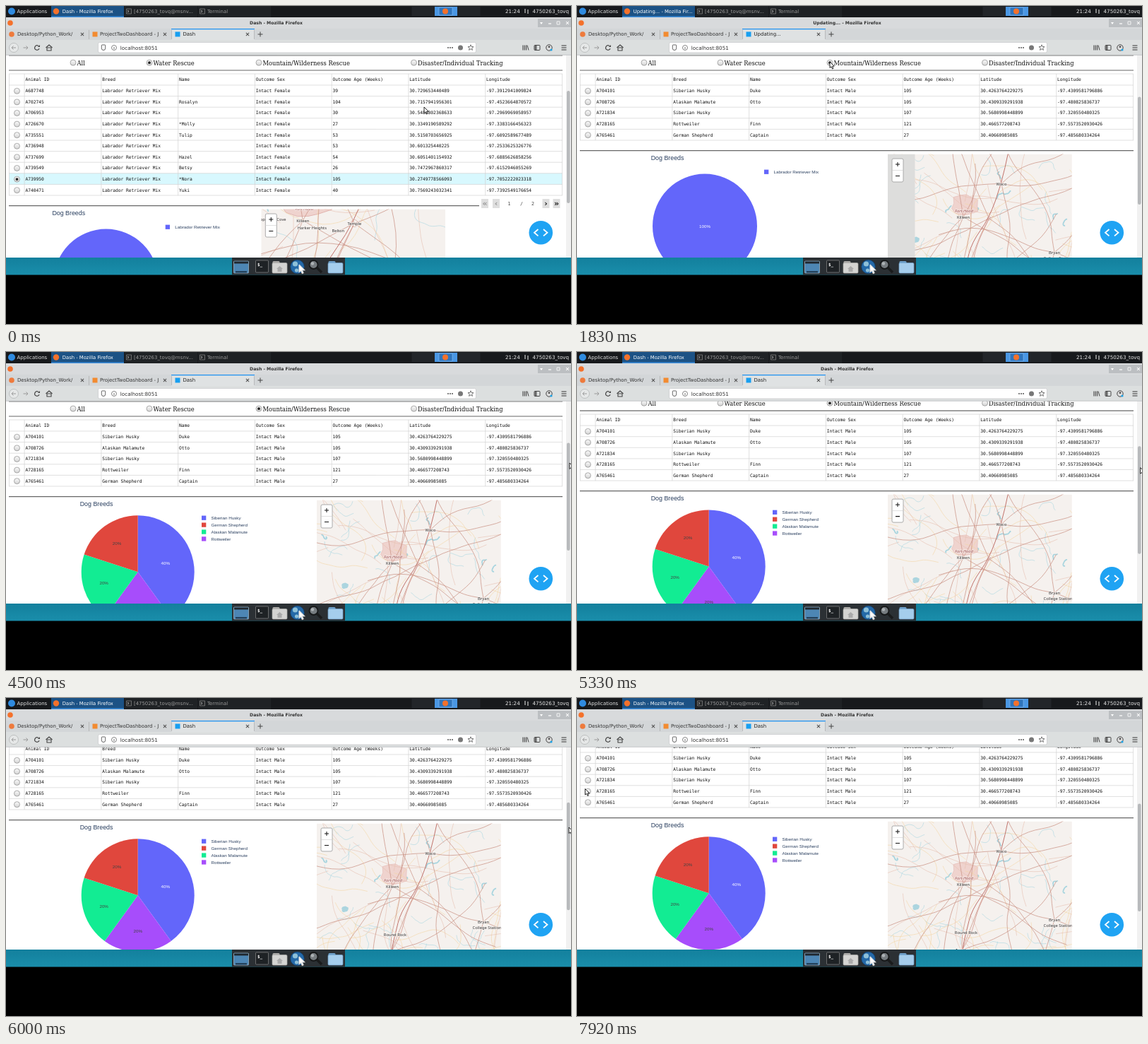
An HTML page with a canvas that plays this animation: 800 px wide and 450 px high, repeating every 8 s.

```html
<!DOCTYPE html>
<html lang="en">
<head>
<meta charset="utf-8">
<title>Dashboard</title>
<style>
html, body { margin: 0; width: 100%; height: 100%; overflow: hidden; background: #000 }
canvas { display: block; width: 100vw; height: 100vh }
</style>
</head>
<body>
<canvas id="stage" width="800" height="450"></canvas>
<script>
const c = document.getElementById('stage').getContext('2d');
const LOOP = 8000, TAU = Math.PI * 2;
const CLICKED = 1000, UPDATING = 1330, FILTERED = 1500, CHARTED = 2420, TEAR = 6830;
const VIEW_TOP = 69, VIEW_BOTTOM = 356, ROW = 15.6;
const UI = '"DejaVu Sans", sans-serif', SERIF = '"DejaVu Serif", serif';
const MONO = '"DejaVu Sans Mono", monospace', PLOT = '"Liberation Sans", Arial, sans-serif';
const MAP = '"Noto Sans", sans-serif';
const BLUE = '#6366fa', RED = '#e0473d', GREEN = '#12ec93', PURPLE = '#a74dfb';

const headers = 'Animal ID|Breed|Name|Outcome Sex|Outcome Age (Weeks)|Latitude|Longitude'.split('|');
const columnX = k => 26.1 + k * 108.77;
const parse = (rows, breed, sex) => rows.trim().split('\n').map(row => {
  const cells = row.trim().split('|');
  if (breed) cells.splice(1, 0, breed);
  cells.splice(3, 0, sex);
  return cells;
});
const waterRows = parse(`
  A687748||39|30.729653440489|-97.3912941009824
  A702745|Rosalyn|104|30.7157941956301|-97.4523664870572
  A706953||30|30.5488802368633|-97.2969969058957
  A726670|*Molly|27|30.3349190589292|-97.3383166456323
  A735551|Tulip|53|30.5150703656925|-97.6092589677489
  A736948||53|30.601325440225|-97.2533625326776
  A737699|Hazel|54|30.6051401154932|-97.6885626858256
  A739549|Betsy|26|30.7472967860317|-97.6152946055269
  A739950|*Nora|105|30.2749778566093|-97.7052222023318
  A740471|Yuki|40|30.7569243032341|-97.7392549176654`, 'Labrador Retriever Mix', 'Intact Female');
const mountainRows = parse(`
  A704101|Siberian Husky|Duke|105|30.4263764229275|-97.4309581796886
  A708726|Alaskan Malamute|Otto|105|30.4309339291938|-97.480825836737
  A721834|Siberian Husky||107|30.5680998448899|-97.320550480325
  A728165|Rottweiler|Finn|121|30.466577208743|-97.5573520930426
  A765461|German Shepherd|Captain|27|30.40660985085|-97.485680334264`, '', 'Intact Male');

// Drawing helpers; text is placed by its vertical centre.
function text(s, x, y, size, color = '#222', family = UI, align = 'left', style = '') {
  c.font = `${style} ${size}px ${family}`;
  c.fillStyle = color;
  c.textAlign = align;
  c.fillText(s, x, y + size * .36);
}
function paint(fill, stroke, width = .8) {
  if (fill) { c.fillStyle = fill; c.fill(); }
  if (stroke) { c.strokeStyle = stroke; c.lineWidth = width; c.stroke(); }
}
function box(x, y, w, h, fill, stroke, width, radius = 0) {
  c.beginPath(); c.roundRect(x, y, w, h, radius);
  paint(fill, stroke, width);
}
function circle(x, y, r, fill, stroke, width) {
  c.beginPath(); c.arc(x, y, r, 0, TAU);
  paint(fill, stroke, width);
}
function path(points, stroke, width, fill) {
  c.beginPath();
  points.forEach(([x, y]) => c.lineTo(x, y));
  paint(fill, stroke, width);
}
const hline = (x1, x2, y, color, width) => path([[x1, y], [x2, y]], color, width);
const vline = (x, y1, y2, color, width) => path([[x, y1], [x, y2]], color, width);
const chevron = (x, y, w, h, color, width) => path([[x - w, y - h], [x, y], [x - w, y + h]], color, width);
function cross(x, y, r, color, turned) {
  c.save(); c.translate(x, y);
  if (turned) c.rotate(TAU / 8);
  hline(-r, r, 0, color, 1); vline(0, -r, r, color, 1);
  c.restore();
}
function clipped(x, y, w, h, draw) {
  c.save(); c.beginPath(); c.rect(x, y, w, h); c.clip(); draw(); c.restore();
}
function radio(x, y, on) {
  const shade = c.createLinearGradient(0, y - 4, 0, y + 4);
  shade.addColorStop(0, '#fafafa'); shade.addColorStop(1, '#d4d4d4');
  circle(x, y, 4, shade, '#888', .7);
  if (on) circle(x, y, 1.9, '#222');
}
function arrow(x, y, scale = 1, stroke = '#111') {
  c.save(); c.translate(x, y); c.scale(scale, scale);
  path([[0, 0], [0, 8.5], [2, 6.8], [3.5, 10], [4.9, 9.4], [3.5, 6.3], [6.2, 6.2], [0, 0]], stroke, .9, '#fff');
  c.restore();
}

// Eased value between key points [time, ...values].
const smooth = u => u * u * (3 - 2 * u), linear = u => u;
function between(keys, t, ease) {
  const i = keys.findIndex(k => k[0] > t);
  if (i < 0) return keys.at(-1).slice(1);
  const [start, ...from] = keys[Math.max(0, i - 1)], [end, ...to] = keys[i];
  const u = ease(Math.max(0, (t - start) / (end - start)));
  return from.map((v, k) => v + (to[k] - v) * u);
}
const pointer = t => between([[80, 592, 143], [830, 358, 79], [3000, 358, 79], [3830, 798, 157],
  [5000, 798, 157], [6000, 797, 183], [6670, 797, 179], [TEAR, 797, 179], [7580, 79, 134],
  [7920, 11.5, 128.5]], t, smooth);
const scrolled = t => t >= TEAR ? (t < TEAR + 85 ? 38 : 35)
  : between([[5000, 0], [5670, 16], [6000, 32], [6500, 41]], t, linear)[0];

// Map: town positions at the wide zoom, joined by one motorway and random roads.
const towns = {
  Waco: [161, 42], Killeen: [107, 89], Bryan: [236, 139], 'College Station': [241, 147.5],
  'Round Rock': [111, 157], Austin: [105, 182.5]
};
const suburbs = { 'Copperas Cove': [85, 88], 'Harker Heights': [113.5, 94], Belton: [132, 96], Temple: [143.5, 91] };
let seed = 1;
const rnd = () => (seed = seed * 16807 % 2147483647) / 2147483647;

function curve(points, color, width) {
  c.beginPath(); c.moveTo(...points[0]);
  for (let i = 1; i < points.length - 1; i++) {
    const [x, y] = points[i], [nx, ny] = points[i + 1];
    c.quadraticCurveTo(x, y, (x + nx) / 2, (y + ny) / 2);
  }
  c.lineTo(...points.at(-1));
  paint(null, color, width);
}
function wander(x, y, angle, step, bend, color, width) {
  const points = [[x, y]];
  for (let i = 0; i < 9; i++) {
    angle += (rnd() - .5) * bend;
    points.push([x += Math.cos(angle) * step, y += Math.sin(angle) * step]);
  }
  curve(points, color, width);
}
function scatter(count, step, bend, color, width) {
  while (count--) wander(rnd() * 270, rnd() * 240, rnd() * TAU, step, bend, color, width);
}
function blob(x, y, r, fill, stroke) {
  const points = Array.from({ length: 13 }, (_, i) => {
    const d = r * (.75 + rnd() * .45);
    return [x + d * Math.cos(i * TAU / 13), y + d * Math.sin(i * TAU / 13) * .85];
  });
  path([...points, points[0]], stroke, .4, fill);
}
function townLabel(name, x, y, color = '#333', style = '') {
  c.font = `${style} 5.8px ${MAP}`;
  c.textAlign = 'center'; c.strokeStyle = '#f7f3f0cc'; c.lineWidth = 1.4;
  c.strokeText(name, x, y + 2.1);
  text(name, x, y, 5.8, color, MAP, 'center', style);
}
function drawMap(zoom, loaded) {
  const place = ([x, y]) => zoom === 1 ? [x, y] : [2 * x - 155, 2 * y - 162];
  seed = 4211;
  box(0, 0, 261, 234, '#f5f1ee');
  c.save();
  c.translate(...place([0, 0])); c.scale(zoom, zoom);
  const w = 1 / zoom;
  scatter(45, 4, 1.6, '#b3dae2', .7 * w);
  for (let i = 0; i < 9; i++) scatter(1, 1.6, 2.4, '#a9d5df', 1.8 * w);
  blob(40, 121, 5, '#acd5df');
  blob(126, 78, 3.5, '#acd5df');
  blob(109, 73, 18, '#efd3ce', '#dfaaa5');
  scatter(45, 11, .9, '#f3d5a4', .6 * w);
  scatter(26, 14, .5, '#e6c0b0', .6 * w);
  for (const hub of [towns.Waco, towns.Killeen, towns.Bryan, towns.Austin, suburbs.Temple])
    for (let i = 0; i < 5; i++)
      wander(...hub, (i + rnd() * .7) * TAU / 5, 19, .5, '#cb9487', .75 * w);
  curve([[103, 234], towns.Austin, towns['Round Rock'], [119, 125], suburbs.Temple, towns.Waco, [171, -4]], '#c0736c', w);
  curve([towns.Austin, [119, 160], [126, 128], suburbs.Temple], '#cf8a80', .7 * w);
  circle(...suburbs.Temple, 2.5, null, '#cf9a8c', .6 * w);
  c.restore();
  if (!loaded) box(0, 0, 38.5, 234, '#dddddc');
  const shown = zoom === 1 ? towns : { Killeen: towns.Killeen, ...suburbs };
  for (const name in shown) townLabel(name, ...place(shown[name]), '#333', name === 'Austin' ? 'bold' : '');
  townLabel('Fort Hood', ...place([108, 80.5]), '#944', 'italic');

  box(6, 6.5, 16, 33, '#fff', '#aaa', 1, 2);
  hline(6, 22, 23, '#ccc', .6);
  cross(14, 14.5, 3, '#111');
  hline(11, 17, 31, '#111', 1.1);
}

function pie(x, y, r, slices) {
  let from = -TAU / 4;
  for (const [share, color] of slices) {
    const to = from + share * TAU, mid = (from + to) / 2;
    c.beginPath(); c.moveTo(x, y); c.arc(x, y, r, from, to);
    paint(color);
    const d = share === 1 ? 0 : share > .3 ? 41 : 50.5;
    text(share * 100 + '%', x + Math.cos(mid) * d, y + Math.sin(mid) * d, 6.25,
      color === BLUE ? '#fff' : '#444', PLOT, 'center');
    from = to;
  }
}
function legend(x, y, entries) {
  entries.forEach(([name, color], i) => {
    box(x, y + i * 9.9 - 3, 6.3, 6.3, color);
    text(name, x + 13.5, y + i * 9.9, 6.25, '#2a3f5f', PLOT);
  });
}
function table(rows, selected) {
  const rowTop = i => 112 + i * ROW, bottom = rowTop(rows.length);
  if (selected >= 0) box(4.5, rowTop(selected), 783, ROW, '#d8f8fe');
  for (let i = -1; i <= rows.length; i++) hline(4, 788, i < 0 ? 96 : rowTop(i), '#d3d3d3', .7);
  for (let k = -1; k < 8; k++) vline(k < 0 ? 4.5 : columnX(k), 96, bottom, '#d3d3d3', .7);
  const cell = (s, k, y) => text(s, columnX(k) + 1.3, y, 6.25, '#111', MONO);
  headers.forEach((s, k) => cell(s, k, 104));
  rows.forEach((cells, i) => {
    const y = rowTop(i + .5) + .2;
    radio(15.5, y + .3, i === selected);
    cells.forEach((s, k) => cell(s, k, y));
  });
}
function pager() {
  [['«', 678], ['‹', 694], ['›', 764.5], ['»', 779.5]].forEach(([s, x], i) => {
    box(x - 5, 273, 10, 13, '#dedede');
    text(s, x, 279, 11, i < 2 ? '#999' : '#222', UI, 'center', 'bold');
  });
  [['1', 712.5], ['/', 730], ['2', 746]].forEach(([s, x]) => text(s, x, 279.5, 6.6, '#444', MONO, 'center'));
}
function page(t, scroll, top, bottom) {
  const filtered = t >= FILTERED, choice = t >= CLICKED ? 2 : 1;
  const dx = filtered ? 0 : -39.3, dy = filtered ? 0 : 5 * ROW;
  const rule = (y, right = 788) => hline(4, right, y, '#666', 1.2);
  clipped(0, top, 793, bottom - top, () => {
    c.translate(0, -scroll);
    rule(69.8);
    [['All', 95], ['Water Rescue', 203], ['Mountain/Wilderness Rescue', 358], ['Disaster/Individual Tracking', 577.5]]
      .forEach(([s, x], i) => { radio(x, 80.2, i === choice); text(s, x + 5.5, 81.2, 8.33, '#111', SERIF); });
    rule(91);
    table(filtered ? mountainRows : waterRows, filtered ? -1 : 8);
    if (!filtered) pager();
    rule(204.6 + dy, filtered ? 788 : 670);
    text('Dog Breeds', 104.7 + dx, 215 + dy, 8.85, '#2a3f5f', PLOT);
    if (t >= CHARTED) {
      pie(186.7, 311.3, 80, [[.4, BLUE], [.2, PURPLE], [.2, GREEN], [.2, RED]]);
      legend(277, 234.6, [['Siberian Husky', BLUE], ['German Shepherd', RED], ['Alaskan Malamute', GREEN], ['Rottweiler', PURPLE]]);
    } else {
      pie(181 + dx, 311.5 + dy, 74, [[1, BLUE]]);
      legend(265 + dx, 234.6 + dy, [['Labrador Retriever Mix', BLUE]]);
    }
    const mapX = filtered ? 440 : 361.3, mapY = 209.5 + dy;
    clipped(mapX, mapY, 260.7, 234, () => {
      c.translate(mapX, mapY);
      drawMap(filtered ? 1 : 2, !filtered || t >= 2250);
    });
  });
}

function panel(updating) {
  box(0, 0, 800, 16, '#17191c');
  circle(8, 7.5, 5, '#2f8be0');
  text('Applications', 15.5, 7.5, 7, '#e4e4e4');
  box(64, 0, 103, 16, '#1c5285');
  box(64, 14.5, 103, 1.5, '#3c8ddb');
  circle(71, 7.5, 4.2, '#f4712b');
  text(updating ? 'Updating... - Mozilla Fir...' : 'Dash - Mozilla Firefox', 79.8, 7.5, 6.8, '#fff');
  [['[4750263_tovq@msnv...', 168], ['Terminal', 272]].forEach(([s, x]) => {
    box(x, 0, 103, 16, '#1f2225');
    box(x + 2.5, 4, 7, 7, '#26282a', '#888', .7);
    chevron(x + 6, 7.5, 2, 1.5, '#ddd', .7);
    text(s, x + 13, 7.5, 6.9, '#9b9b9b');
  });
  box(574.5, 1, 97, 13, '#222529');
  box(607, 1, 32, 13, '#4a97e4');
  box(613, 2, 19, 11, '#2f75bd', '#81b8ef', .7);
  circle(622, 7.5, 4, '#f4712b');
  text('21:24', 707, 7.5, 7.2, '#e8e8e8');
  vline(735, 4, 10, '#ccc', 1.2);
  vline(739, 5, 11, '#ccc', 1.2);
  text('4750263_tovq', 745.5, 7.5, 7.2, '#e8e8e8');
}
function tabStrip(updating) {
  box(0, 32, 800, 16, '#d3d6d8');
  box(234, 32, 118, 16, '#dfe2e3');
  box(234, 32, 118, 1.2, '#1e90f0');
  circle(8, 40, 3.8, '#ee7a3c');
  box(122.5, 36.5, 7, 7, '#f28b30');
  box(239.5, 36.5, 7, 7, '#189ff0');
  text('Desktop/Python_Work/', 16, 40, 6.94, '#333');
  clipped(120, 32, 99, 16, () => text('ProjectTwoDashboard - J', 133, 40, 6.94, '#333'));
  text(updating ? 'Updating...' : 'Dash', 250.5, 40, 6.94, '#222');
  for (let x = 108; x < 350; x += 117) {
    cross(x, 40, 3, '#555', true);
    vline(x + 9.5, 34, 47, '#aaa', .7);
  }
  cross(360, 40, 3.5, '#444');
}
function toolbar() {
  box(0, 48, 800, 21.5, '#dcdfdf');
  circle(11, 59, 6.5, '#e6e8e8', '#b4b6b6');
  hline(8, 14, 59, '#999', 1); chevron(8, 59, -2.5, 2.5, '#999', 1);
  hline(24.5, 31, 59, '#999', 1); chevron(31, 59, 2.5, 2.5, '#999', 1);
  c.beginPath(); c.arc(44, 59, 3.3, .4, 5.4); paint(null, '#444', 1.2);
  path([[45, 58], [48, 58], [48, 55]], null, 0, '#444');
  path([[56.5, 59], [61, 55], [65.5, 59]], '#444', 1.2);
  box(58, 59, 6, 4, null, '#444', 1.1);
  box(130.5, 51.5, 535, 14.5, '#fff', '#c6c8ca', .7, 2);
  box(135.3, 55, 5.4, 7.5, null, '#555', .9, [1, 1, 3, 3]);
  circle(153, 59, 3.5, null, '#666'); vline(153, 58, 61, '#666', .9);
  text('localhost:8051', 161.8, 59, 7.2, '#333');
  for (let x = 626; x < 633; x += 3) circle(x, 59, .9, '#444');
  circle(643.5, 59, 3.5, '#777');
  path(Array.from({ length: 11 }, (_, i) => {
    const a = i * TAU / 10 - TAU / 4, r = i % 2 ? 1.8 : 4.2;
    return [658 + r * Math.cos(a), 59 + r * Math.sin(a)];
  }), '#555', .8);
  for (let i = 0; i < 3; i++) {
    vline(732 + i * 2.3, 55.5, 62.5, '#444', 1.1);
    hline(786.5, 793.5, 56 + i * 3, '#444', 1.1);
  }
  path([[738, 55.5], [740, 62.5]], '#444', 1);
  box(748, 55.5, 8, 7, null, '#444', 1, 1); box(748.5, 56, 3, 6, '#666');
  circle(769, 59, 4.2, '#ddd', '#444', 1); circle(769, 57.7, 1.3, '#444');
  circle(772, 62, 1.6, '#1aa1e5');
  hline(0, 800, 69.3, '#b9bbbd', .7);
}
function browser(updating) {
  box(0, 16, 800, 16, '#d8dadc');
  circle(6, 24, 3.8, '#f4712b');
  text((updating ? 'Updating...' : 'Dash') + ' - Mozilla Firefox', 382.5, 24, 6.15, '#333', UI, 'center', 'bold');
  box(753, 18, 47, 12, '#bcbfc2');
  path([[756, 23], [760, 23], [758, 26]], null, 0, '#fff');
  hline(768, 772, 25, '#fff', 1.2);
  box(780, 22, 4, 4, null, '#fff', .8);
  cross(795, 24, 2.8, '#fff', true);
  tabStrip(updating);
  toolbar();
}

function folder(x, front, back) {
  box(x - 10, 361, 10, 6, back, null, 0, 1.5);
  box(x - 10.5, 363.5, 21, 14.5, front, back, .7, 1.5);
}
function desktop() {
  const sea = c.createLinearGradient(0, VIEW_BOTTOM, 0, 381);
  sea.addColorStop(0, '#13809d'); sea.addColorStop(1, '#1a8eab');
  box(0, VIEW_BOTTOM, 800, 24.5, sea);
  box(320, VIEW_BOTTOM, 160, 24.5, '#2b3034');
  box(322.5, 361, 21, 17, '#4d86b4', '#a7bccb', .7, 1);
  box(323, 361.5, 20, 3, '#20282f'); box(325, 375, 16, 2.5, '#24425c');
  box(353.5, 360, 18, 17, '#1e2225', '#888', .7, 1);
  text('$_', 356, 366, 6, '#fff', MONO, 'left', 'bold');
  folder(387.5, '#d4d4d2', '#aaa9a7');
  path([[383, 372], [387.5, 368], [392, 372]], null, 0, '#aaa');
  box(384.5, 372, 6, 4, '#aaa');
  circle(412.5, 369, 9.8, '#2469a8', '#123e6b');
  circle(409.5, 365, 3.6, '#8ec0d8');
  circle(411.5, 374, 2.6, '#8ec0d8');
  arrow(415, 366, 1.25, '#ddd');
  path([[440, 370], [447, 377]], '#1a1b1c', 3.5);
  circle(435.5, 366, 6, '#767c80', '#17191a', 1.8);
  circle(434, 364.5, 2.2, '#adb3b5');
  folder(466.5, '#a5cdec', '#6d9fc9');
}

function draw(t) {
  const updating = t >= UPDATING && t < CHARTED;
  const scroll = scrolled(t), filtered = t >= FILTERED;
  box(0, 0, 800, 450, '#000');
  box(0, VIEW_TOP, 800, VIEW_BOTTOM - VIEW_TOP, '#fff');
  // The screen tears briefly as the page settles back.
  const tearY = t >= TEAR && t < TEAR + 85 ? 131 : VIEW_TOP;
  if (tearY > VIEW_TOP) page(t, 41, VIEW_TOP, tearY);
  page(t, scroll, tearY, VIEW_BOTTOM);
  box(793, VIEW_TOP, 7, VIEW_BOTTOM - VIEW_TOP, '#f1f1f1');
  box(794, filtered ? 128.5 + scroll * .6 : 120, 4.6, filtered ? 152.5 : 159, '#b8babc', null, 0, 2.3);
  circle(757.3, 320.7, 16.8, '#1fa3f3');
  chevron(748, 320.7, -5.5, 4.7, '#fff', 1.8);
  chevron(766.5, 320.7, 5.5, 4.7, '#fff', 1.8);
  browser(updating);
  panel(updating);
  desktop();
  arrow(...pointer(t));
}
function tick(now) {
  draw(now % LOOP);
  requestAnimationFrame(tick);
}
draw(0);
requestAnimationFrame(tick);
</script>
</body>
</html>
```
